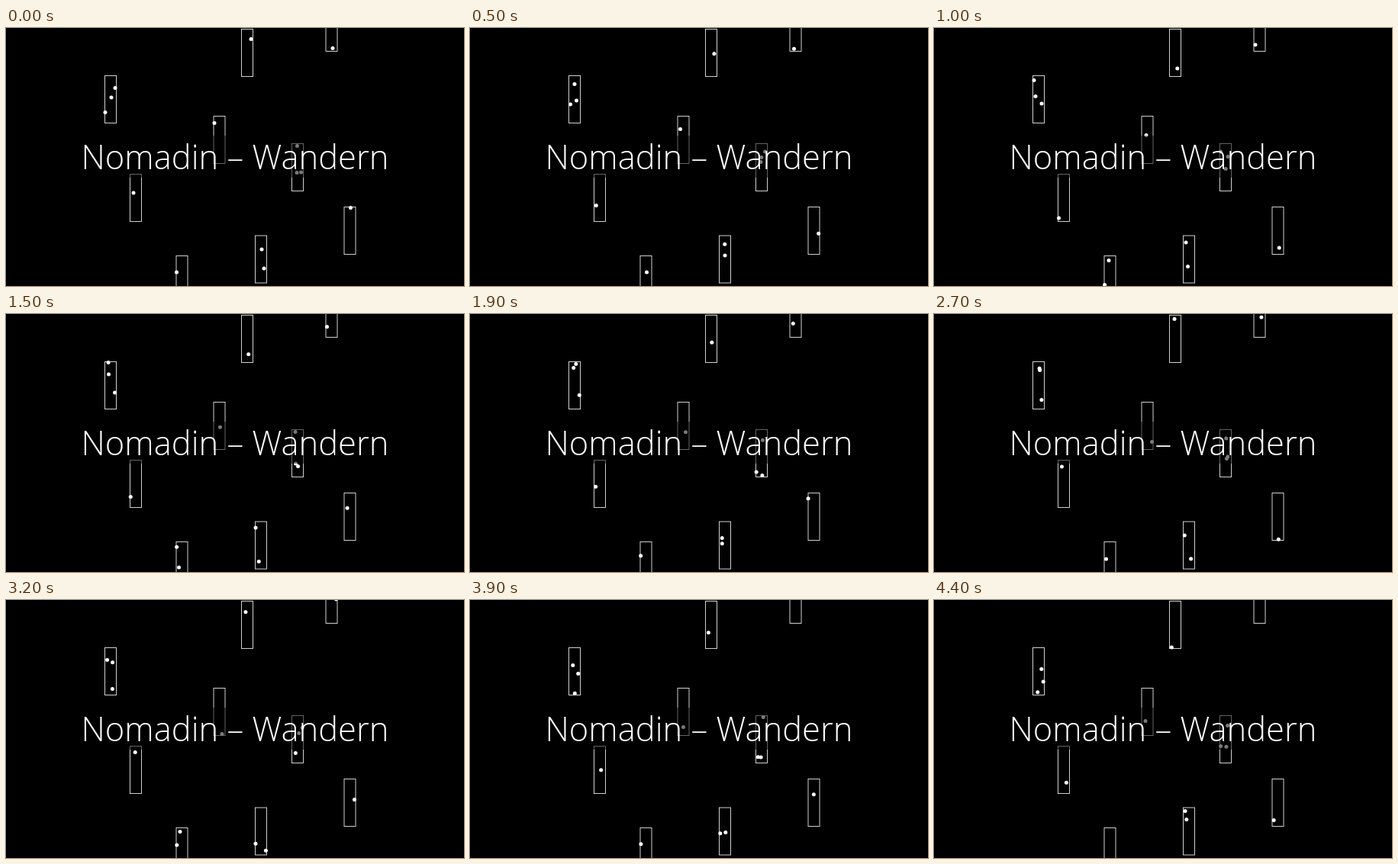
Recreate the animation shown at these times as an HTML page. Size 600 by 338 pixels, loop 4500 ms.

```html
<!DOCTYPE html>
<html lang="de">
<head>
<meta charset="utf-8">
<title>Nomadin – Wandern</title>
<style>
  html, body { margin: 0; width: 100%; height: 100%; overflow: hidden; background: #000; }
  svg { display: block; width: 600px; height: 338px; }
  .box { fill: none; stroke: #d0d0d0; stroke-width: 1; }
  .dot { fill: #fff; }
  text { font: 300 43.5px "Open Sans", "Noto Sans", sans-serif; fill: #fff; text-anchor: middle; }
</style>
</head>
<body>
<svg viewBox="0 0 600 338">
  <g id="stage"></g>
  <rect x="96" y="141" width="408" height="55" opacity=".52"/>
  <text x="300" y="185">Nomadin – Wandern</text>
</svg>
<script>
const LOOP = 4500, STEP = 100, WIDTH = 15, HEIGHT = 62;
const stage = document.getElementById('stage');
const dots = [];

function add(tag, attrs) {
  const el = document.createElementNS('http://www.w3.org/2000/svg', tag);
  for (const name in attrs) el.setAttribute(name, attrs[name]);
  return stage.appendChild(el);
}

// A dot starts at x, y inside its box and moves at vx, vy pixels per second.
function box(left, top, ...starts) {
  add('rect', { class: 'box', x: left, y: top, width: WIDTH, height: HEIGHT });
  for (const [x, vx, y, vy] of starts)
    dots.push({ left, top, x, vx, y, vy, el: add('circle', { class: 'dot', r: 2.5 }) });
}

// Mirror a distance between two walls.
function bounce(distance, size) {
  const d = Math.abs(distance) % (2 * size);
  return Math.min(d, 2 * size - d);
}

box(129.5, 62.5, [13.5, -12, 16, -10], [.5, 3, -48, 21], [8.5, 3, 28.5, 8]);
box(308.5, 1.5, [12.5, -2.2, 13, 38.5]);
box(419, -31.5, [9, -7, 58, 10.5]);
box(272, 115.5, [1, 5, 9, 15.9]);
box(374.5, 151.5, [12, -11, 37.5, -27], [7, .7, 3, 30], [21.5, -11, -38, 55]);
box(162.5, 191.5, [4.5, -3.5, 24.5, 33]);
box(443, 234.5, [8.5, 10.3, 1, 67.5]);
box(326.5, 272, [8.5, -2.5, -18, 58.5], [11.5, -8, 43, -34]);
box(223, 298.5, [.5, .1, 21.5, 62.5], [11, -5, -49, 55]);

function draw(now) {
  const t = Math.floor(now % LOOP / STEP) * STEP / 1000;
  for (const { left, top, x, vx, y, vy, el } of dots) {
    el.setAttribute('cx', left + bounce(x + vx * t, WIDTH - 1));
    el.setAttribute('cy', top + bounce(y + vy * t, HEIGHT - 1));
  }
}

const start = performance.now();
function tick() {
  draw(performance.now() - start);
  requestAnimationFrame(tick);
}
tick();
</script>
</body>
</html>
```
